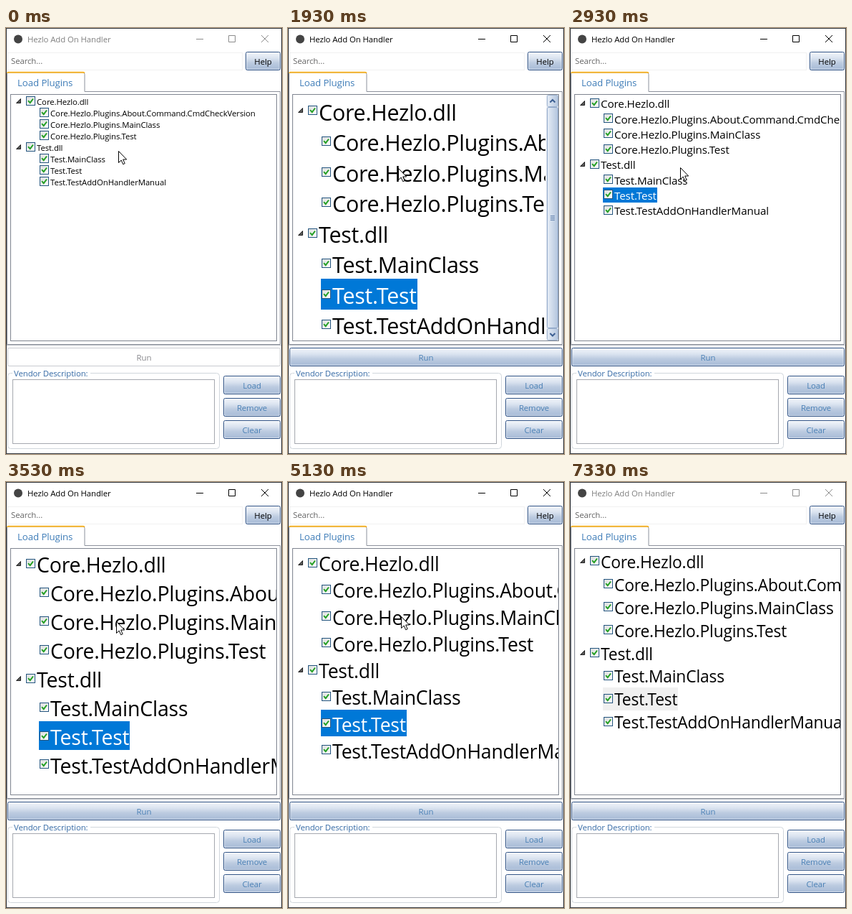
Write an HTML page that moves like this. It is 386 px wide and 593 px high and loops after 7470 ms.

```html
<!DOCTYPE html>
<html lang="en">
<head>
<meta charset="utf-8">
<title>Plugin window</title>
<style>
  html, body { margin: 0; width: 100%; height: 100%; overflow: hidden; background: #fff; }
  svg { display: block; width: 386px; height: 593px; }
  text { font-family: "Open Sans", "Noto Sans", sans-serif; letter-spacing: -.008em; white-space: pre; }
</style>
</head>
<body>
<svg id="stage" viewBox="0 0 386 593">
  <defs>
    <linearGradient id="face" x2="0" y2="1">
      <stop offset="0" stop-color="#f4f7fb"/><stop offset=".35" stop-color="#d9e2ef"/>
      <stop offset=".6" stop-color="#bccbe0"/><stop offset="1" stop-color="#a6bad6"/>
    </linearGradient>
    <linearGradient id="hot" x2="0" y2="1">
      <stop offset="0" stop-color="#fff"/><stop offset="1" stop-color="#c9d8ec"/>
    </linearGradient>
    <linearGradient id="thumb">
      <stop offset="0" stop-color="#e6edf6"/><stop offset="1" stop-color="#b3c5de"/>
    </linearGradient>
    <linearGradient id="box" x2="1" y2="1">
      <stop offset="0" stop-color="#d9dcdc"/><stop offset="1" stop-color="#fff"/>
    </linearGradient>
    <clipPath id="view"><rect id="viewRect" x="7" y="93" width="371" height="342"/></clipPath>
  </defs>
</svg>
<script>
const NS = 'http://www.w3.org/2000/svg';
const stage = document.getElementById('stage');
const viewRect = document.getElementById('viewRect');
const FRAME = 1000 / 15, LOOP = 7470;
const TOP = 94, SELECTED = 6, FONT_SCALE = .95;
const SELECT_FRAME = 11, CURSOR_END = 105, BLUR_FRAME = 110;

function set(node, attrs) {
  for (const key in attrs) node.setAttribute(key, attrs[key]);
  return node;
}
function add(tag, attrs, parent = stage) {
  return parent.appendChild(set(document.createElementNS(NS, tag), attrs));
}
function rect(x, y, width, height, fill, stroke = 'none', rx = 0, parent = stage) {
  return add('rect', { x, y, width, height, fill, stroke, rx }, parent);
}
function path(d, stroke, width = 1, fill = 'none', parent = stage) {
  return add('path', { d, stroke, 'stroke-width': width, fill }, parent);
}
function label(content, x, y, fill, size = 12, anchor = 'start', parent = stage) {
  const node = add('text', { x, y, fill, 'font-size': size * FONT_SCALE, 'text-anchor': anchor }, parent);
  node.textContent = content;
  return node;
}
function button(content, x, y, width, color = '#4a80b5') {
  const face = rect(x + .5, y + .5, width - 1, 25, 'url(#face)', '#2f5285', 2);
  const shine = rect(x + 1.5, y + 1.5, width - 3, 23, 'none', '#fff', 1.5);
  set(shine, { 'stroke-opacity': .55 });
  const text = label(content, x + width / 2, y + 18, color, 12, 'middle');
  return { face, shine, text };
}

// Window chrome
rect(0, 0, 386, 593, '#fff');
add('circle', { cx: 17, cy: 15.5, r: 6, fill: '#444' });
const title = label('Hezlo Add On Handler', 30, 20, '#000');
const controls = path('M266 15.5h10M311.5 10.5h9v9h-9zM357 10l10 10M367 10l-10 10', '#000');
rect(2.5, 34.5, 328, 24, '#fff', '#f1f1f1');
label('Search...', 7, 50, '#666');
button('Help', 335, 33, 49, '#000');

// Tab page
path('M110 88.5H383.5V440.5H1.5V88', '#8c919b');
path('M1 441.5H384.5', '#b9bdc5');
path('M1.5 89V64q0-2 2-2H107.500q2.500 0 2.500 2.500V88.500', '#8c919b', 1, '#fff');
path('M2 63q0-1.200 1.500-1.200H108q1.500 0 1.500 1.200', '#f7b52c', 2);
label('Load Plugins', 16, 81, '#3f7db8', 14);
rect(6.5, 92.5, 372, 343, '#fff', '#7f8590');

// Lower panel
const run = button('Run', 2, 445, 382);
rect(2.5, 480.5, 296, 105, '#fff', '#d0d6dc', 4);
rect(9, 474, 109, 13, '#fff');
label('Vendor Description:', 11, 485, '#356aa5');
rect(9.5, 489.5, 282, 89, '#fff', '#a5a8af');
['Load', 'Remove', 'Clear'].forEach((name, i) => button(name, 304, 484 + 31 * i, 80));

// Tree
const tree = add('g', { 'clip-path': 'url(#view)' });
const highlight = rect(46, 0, 0, 0, '#0078d7', 'none', 0, tree);
const rows = [
  'Core.Hezlo.dll',
  '>Core.Hezlo.Plugins.About.Command.CmdCheckVersion',
  '>Core.Hezlo.Plugins.MainClass',
  '>Core.Hezlo.Plugins.Test',
  'Test.dll',
  '>Test.MainClass',
  '>Test.Test',
  '>Test.TestAddOnHandlerManual'
].map(entry => {
  const child = entry[0] === '>';
  const x = child ? 47 : 28;
  const mark = add('g', {}, tree);
  if (!child) path('M20.5 3.5v6h-6z', '#262626', 1, '#595959', mark);
  rect(x + .5, .5, 12, 12, 'url(#box)', '#24557f', 0, mark);
  path(`M${x + 3} 6.200l2.700 3 4.300-5.700`, '#24a024', 2, 'none', mark);
  return { mark, text: label(entry.replace('>', ''), x + 15, 0, '#000', 12, 'start', tree) };
});

// Scroll bar
const scroll = add('g', {});
rect(361, 93, 17, 342, '#eef1f6', 'none', 0, scroll);
rect(362.5, 93.5, 15, 16, 'url(#thumb)', '#9db2cf', 2, scroll);
rect(362.5, 110.5, 15, 307, 'url(#thumb)', '#8ea6c8', 2, scroll);
rect(362.5, 418.5, 15, 16, 'url(#thumb)', '#9db2cf', 2, scroll);
path('M366.500 103.500l3.500-3.500 3.500 3.500M366.500 425l3.500 3.500 3.500-3.500', '#3c5f92', 2, 'none', scroll);
path('M367 261.500h6M367 263.500h6M367 265.500h6M367 267.500h6', '#6e8bb4', 1, 'none', scroll);

const cursor = path('M.5.5V16.500L4.200 13 6.700 18.700 9.200 17.600 6.700 12H11.700Z', '#000', 1, '#fff');
rect(.5, .5, 385, 592, 'none', '#30343a');

// Wheel flicks: first frame, frames taken, final font size
const flicks = [
  [16, 2, 8], [24, 6, 32], [34, 3, 28], [39, 6, 16], [46, 3, 28], [49, 2, 16],
  [52, 2, 30], [55, 5, 14], [61, 3, 8], [66, 6, 32], [77, 1, 28], [78, 1, 20],
  [82, 2, 12], [86, 5, 26], [94, 2, 18], [98, 3, 24]
];
// Pointer path: frame, x, y
const pointer = [
  [0, 157, 171], [5, 157, 171], [7, 104, 193], [11, 104, 193], [14, 154, 195],
  [39, 154, 195], [44, 154, 194], [61, 154, 194], [64, 155, 191], [72, 158, 187],
  [86, 158, 187], [90, 165, 186], [100, 165, 186], [104, 190, 464]
];

function fontSizeAt(frame) {
  let size = 12;
  for (const [start, count, goal] of flicks) {
    const part = Math.min(1, Math.max(0, (frame - start + 1) / count));
    size += (goal - size) * part;
  }
  return 2 * Math.round(size / 2);
}

function pointerAt(frame) {
  const next = pointer.findIndex(key => key[0] > frame);
  if (next < 0) return pointer[pointer.length - 1].slice(1);
  const a = pointer[next - 1], b = pointer[next];
  const part = (frame - a[0]) / (b[0] - a[0]);
  return [1, 2].map(i => Math.round(a[i] + (b[i] - a[i]) * part));
}

function drawTree(size, selected, active) {
  const height = Math.max(16, size * 1.33);
  rows.forEach(({ mark, text }, i) => {
    const y = TOP + i * height;
    const white = i === SELECTED && selected && active;
    set(mark, { transform: `translate(0 ${Math.floor(y + height / 2 - 6.35)})` });
    set(text, {
      y: Math.round(y + size * 1.079), 'font-size': size * FONT_SCALE,
      fill: white ? '#fff' : '#000'
    });
  });
  set(highlight, {
    y: Math.round(TOP + SELECTED * height), height: Math.round(height),
    width: selected ? Math.floor(18 + size * 3.66) : 0,
    fill: active ? '#0078d7' : '#f0f0f0'
  });
  const overflow = size > 30;
  set(scroll, { visibility: overflow ? 'visible' : 'hidden' });
  set(viewRect, { width: overflow ? 353 : 371 });
}

function draw(time) {
  const frame = Math.floor(time / FRAME + .1);
  const selected = frame >= SELECT_FRAME;
  const active = selected && frame < BLUR_FRAME;
  const [x, y] = pointerAt(frame);
  const shown = frame < CURSOR_END;
  const hover = shown && y > 444 && y < 471;

  drawTree(fontSizeAt(frame), selected, active);
  set(title, { fill: active ? '#000' : '#808080' });
  set(controls, { stroke: active ? '#000' : '#8c8c8c' });
  set(run.face, {
    fill: hover ? 'url(#hot)' : selected ? 'url(#face)' : '#fff',
    stroke: selected ? '#2f5285' : '#c9cbd0'
  });
  set(run.shine, { visibility: selected ? 'visible' : 'hidden' });
  set(run.text, { fill: selected ? '#4a80b5' : '#85858a' });
  set(cursor, { transform: `translate(${x} ${y})`, visibility: shown ? 'visible' : 'hidden' });
}

const start = performance.now();
function tick() {
  draw((performance.now() - start) % LOOP);
  requestAnimationFrame(tick);
}
tick();
</script>
</body>
</html>
```
